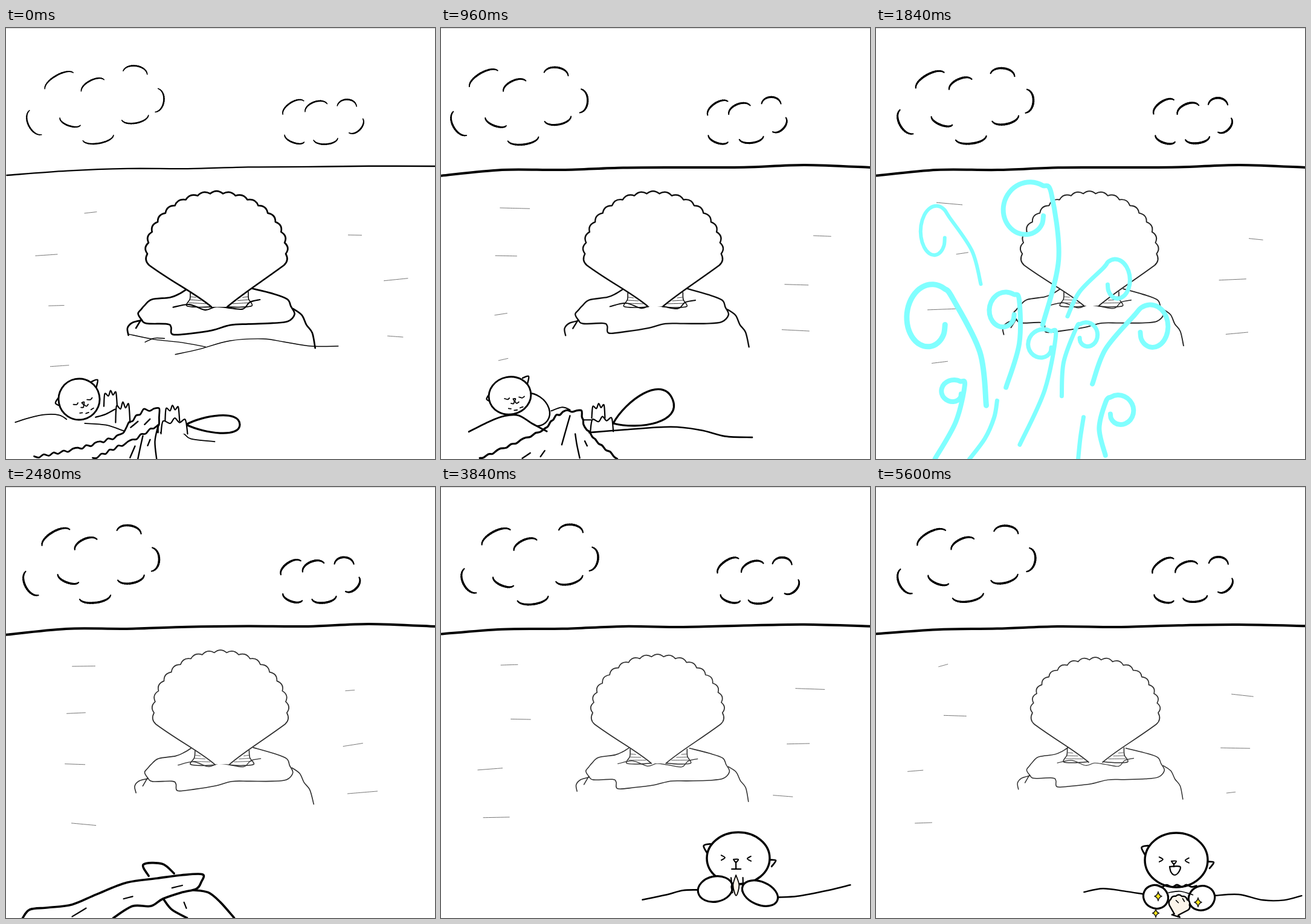
An HTML page with a canvas for the animation above (5.68 s loop, 710 by 714 pixels).

```html
<!DOCTYPE html>
<html lang="ja">
<head>
<meta charset="utf-8">
<title>Shell bay</title>
<style>
html, body { margin: 0; width: 100%; height: 100%; overflow: hidden; background: #fff; }
canvas { display: block; width: 710px; height: 714px; }
</style>
</head>
<body>
<canvas id="stage" width="710" height="714"></canvas>
<script>
const c = document.getElementById('stage').getContext('2d');
const STEP = 80, FRAMES = 71, PI = Math.PI;
const HELD = [3, 7, 9, 11, 20, 27, 30, 34, 37, 40, 47, 51, 54];
const CREAM = '#fcf5ea', CYAN = '#80ffff', WHITE = '#fff';

const nums = s => s.split(' ').map(Number);
const mix = (a, b, u) => a + (b - a) * u;
const mixAll = (a, b, u) => a.map((v, i) => mix(v, b[i], u));
const clamp = v => Math.max(0, Math.min(1, v));
const ease = v => { v = clamp(v); return v * v * (3 - 2 * v); };

// Seeded random numbers from 0 to 1
function dice(seed) {
  let s = (seed + 1) * 7919;
  const roll = () => (s = (s * 16807 + 11) % 2147483647) / 2147483647;
  roll(); roll();
  return roll;
}

// Wobble of a line drawn anew
let amp = 0, seed = 0;
const bend = (x, y) => [
  x + amp * Math.sin(y * .03 + seed * 1.7),
  y + amp * .7 * Math.sin(x * .025 + seed * 2.3)
];

function place(x, y, rot, sx, sy, paint) {
  c.save();
  c.translate(x, y);
  c.rotate(rot);
  c.scale(sx, sy);
  paint();
  c.restore();
}

function finish(width, color = '#000', fill) {
  if (fill) { c.fillStyle = fill; c.fill(); }
  c.lineWidth = width;
  c.strokeStyle = color;
  c.stroke();
}

// Smooth strokes through points; "/" starts a new stroke
function ink(text, width, color, fill) {
  for (const part of text.split('/')) {
    const n = nums(part), p = [];
    for (let i = 0; i < n.length; i += 2) p.push(bend(n[i], n[i + 1]));
    const at = i => p[Math.max(0, Math.min(p.length - 1, i))];
    c.beginPath();
    c.moveTo(...p[0]);
    for (let i = 0; i < p.length - 1; i++) {
      const [a, b, d, e] = [at(i - 1), at(i), at(i + 1), at(i + 2)];
      c.bezierCurveTo(b[0] + (d[0] - a[0]) / 6, b[1] + (d[1] - a[1]) / 6,
        d[0] - (e[0] - b[0]) / 6, d[1] - (e[1] - b[1]) / 6, d[0], d[1]);
    }
    finish(width, color, fill);
  }
}

// Ragged edge along a polyline
function ragged(text, width, size = 1.8) {
  const n = nums(text), roll = dice(n[0]), out = [];
  for (let i = 0; i < n.length - 2; i += 2) {
    const steps = Math.ceil(Math.hypot(n[i + 2] - n[i], n[i + 3] - n[i + 1]) / 9);
    for (let k = 0; k < steps; k++) {
      out.push(mix(n[i], n[i + 2], k / steps) + (roll() - .5) * size,
        mix(n[i + 1], n[i + 3], k / steps) + (k % 2 - .5) * size * 2);
    }
  }
  ink([...out, ...n.slice(-2)].join(' '), width);
}

function blob(x, y, rx, ry, rot, width) {
  c.beginPath();
  c.ellipse(x, y, rx, ry, rot, 0, 2 * PI);
  finish(width, '#000', WHITE);
}

// ---- Sky and sea ----

// Cloud edges, clockwise: start, end, bulge
const puffs = [
  '66 98 112 72 10', '123 104 160 86 9', '192 72 232 77 11', '252 101 249 140 12',
  '236 146 192 155 9', '181 178 130 186 9', '124 161 90 148 7', '60 178 40 138 12',
  '460 143 494 120 9', '498 140 534 126 10', '550 126 582 127 11', '591 152 568 175 9',
  '551 182 511 186 8', '494 189 462 178 7'
].map(nums);

// Brush arc, thinner at its ends
function puff(x0, y0, x1, y1, bulge, width) {
  const len = Math.hypot(x1 - x0, y1 - y0);
  const nx = (y1 - y0) / len, ny = (x0 - x1) / len;
  const at = t => {
    const along = mix(t, t * t * (3 - 2 * t), .7), up = bulge * 4 * t * (1 - t);
    return bend(mix(x0, x1, along) + nx * up, mix(y0, y1, along) + ny * up);
  };
  const N = 14;
  for (let i = 0; i < N; i++) {
    c.beginPath();
    c.moveTo(...at(i / N));
    c.lineTo(...at((i + 1) / N));
    finish(width * (.6 + .4 * Math.sin(PI * (i + .5) / N)));
  }
}

function sky(d) {
  const roll = dice(d), shake = () => (roll() - .5) * 5;
  const drift = -28 * Math.exp(-d / 30) * Math.sin(PI * d / 23.5) ** 2;
  for (const [x0, y0, x1, y1, bulge] of puffs) {
    const dx = drift + shake(), dy = shake();
    puff(x0 + dx, y0 + dy, x1 + dx, y1 + dy, bulge, mix(2.6, 3.5, ease(d / 20)));
  }
  ink('0 244 100 236 200 234 300 232 400 231 500 230 600 228 710 230', mix(2.3, 4, ease(d / 10)));
}

function ripples(d) {
  const roll = dice(d + 100);
  for (let i = 0; i < 7; i++) {
    const x = (i % 2 ? 545 : 45) + roll() * 90, y = 290 + i * 42 + roll() * 20;
    const len = 14 + roll() * 36;
    ink(`${x} ${y} ${x + len} ${y + (roll() - .6) * 8}`, .9, '#666');
  }
}

// ---- Rock and shell ----

function rock(u, width, color, wet) {
  const s = mix(1, .88, u);
  place(475 * (1 - s), 430 * (1 - s), 0, s, s, () => {
    ink('298 432 285 440 270 446 240 450 228 460 222 467 217 474 223 484 231 490 265 490 272 495 275 507 305 505 340 500 370 492 400 491 440 490 465 487 476 475 470 462 464 450 440 441 405 432', width, color);
    ink('223 485 208 489 200 498 202 510/222 484 214 498/474 466 488 476 496 492 506 505 512 530', width, color);
    ink('275 462 302 457 328 466 345 461 365 463 390 466 402 455 419 451', width * .8, color);
    if (wet) ink('201 508 245 516 290 520 330 527/230 521 245 514 262 514/281 540 320 531 370 518 425 516 460 521 505 527 550 526', 1.4);
  });
}

function hinge(x, y, side, color) {
  place(x, y, 0, side, 1, () => {
    ink('-34 -24 -35 -12 -41 -1 -20 1 0 0', 1.6, color);
    for (let k = 0; k < 3; k++) ink(`${-33 - k * 2} ${-16 + k * 5} ${-25 + k * 8} ${-15 + k * 5}`, .8, color);
  });
}

function bigShell(u, drop, width, color) {
  const L = mix(231, 256, u), R = mix(466, 470, u), T = 271 + 12 * drop, S = 379;
  const ax = mix(340, 352, u), bx = mix(366, 375, u), by = mix(462, 456, u);
  hinge(ax, by, 1, color);
  hinge(bx, by, -1, color);
  const cx = (L + R) / 2, rx = (R - L) / 2 - 3, ry = S - T - 3, N = 17;
  c.beginPath();
  c.moveTo(ax, by);
  c.bezierCurveTo(ax - 26, by - 22, L + 44, S + 42, L + 6, S + 14);
  c.quadraticCurveTo(L - 3, S + 6, cx - rx, S - 5);
  for (let k = 1; k <= N; k++) {
    const m = PI * (1 + (k - .5) / N), a = PI * (1 + k / N), y = S - 5;
    c.quadraticCurveTo(cx + (rx + 8) * Math.cos(m), y + (ry + 3) * Math.sin(m),
      cx + rx * Math.cos(a), y + (ry - 5) * Math.sin(a));
  }
  c.quadraticCurveTo(R + 3, S + 6, R - 6, S + 14);
  c.bezierCurveTo(R - 44, S + 42, bx + 26, by - 22, bx, by);
  finish(width, color, WHITE);
}

function scenery(d) {
  const u = d / (FRAMES - 1), age = ease(d / 34);
  const width = mix(2.7, 1.7, age), color = `rgb(${Array(3).fill(Math.round(48 * age))})`;
  sky(d);
  ripples(d);
  rock(u, width, color, d < 8);
  bigShell(u, ease((d - 36) / 22), width, color);
}

// ---- Sleeping otter, kelp and waves ----

function paw(x, y, w, h) {
  ink([-.5, .5, -.42, -.3, -.15, -.16, .02, -.5, .2, -.22, .42, -.4, .5, .5]
    .map((v, i) => i % 2 ? y + v * h : x + v * w).join(' '), 2.2, '#000', WHITE);
}

function tail(x, y, len, r, rot) {
  place(x, y, rot, 1, 1, () => {
    c.beginPath();
    c.moveTo(0, 0);
    c.bezierCurveTo(len * .3, -r, len, -r * 1.7, len, 0);
    c.bezierCurveTo(len, r * 1.5, len * .35, r, 0, 0);
    finish(3.2, '#000', WHITE);
  });
}

function sleepyHead(x, y, rx, ry, tilt) {
  ink(`${x + 21} ${y - 29} ${x + 31} ${y - 32} ${x + 29} ${y - 20}/${x - 33} ${y - 4} ${x - 39} ${y + 6} ${x - 31} ${y + 11}`, 2.4);
  blob(x, y, rx, ry, -.2, 2.9);
  place(x + 7, y + 7, tilt, 1, 1, () => {
    ink('-16 -4 -11 -2 -8 -4/8 -4 13 -2 17 -4/-2 -2 2 -2 0 2 -2 -2/-6 5 -2 6 0 2 3 6 7 4', 1.8);
    ink('-11 13 -7 14/-2 17 3 17/8 14 13 13', 1.8);
  });
}

function floating() {
  ink('15 653 40 645 65 640 88 641 100 648/130 655 165 658 195 668/255 670 290 670 305 680 345 685', 1.8);
  ink('148 645 165 640 180 632', 2.2);
  paw(173, 614, 22, 26);
  paw(193, 637, 24, 34);
  tail(298, 657, 89, 15, 0);
  paw(275, 638, 24, 26);
  paw(278, 659, 44, 26);
  sleepyHead(121, 615, 34, 34, -.35);
  ragged('47 711 118 697 155 687 190 675 204 655 228 633 254 632 251 670', 2.8);
  ragged('144 714 185 694 208 684 252 657', 2.8);
  ink('226 676 222 694 218 714/251 660 246 685 249 714/205 712 213 693/206 662 218 652/229 657 238 648/234 692 238 682', 2.4);
}

function tuckedIn() {
  blob(150, 632, 32, 25, .6, 2.4);
  sleepyHead(114, 609, 35, 31, -.1);
  paw(260, 634, 22, 24);
  paw(266, 656, 38, 25);
  tail(285, 655, 106, 27, -.38);
  ink('182 634 200 628 213 632/235 649 248 649', 2);
  ink('46 669 80 652 105 643 128 642 150 655 175 668', 2.8, '#000', WHITE);
  ink('245 670 300 666 380 661 430 666 470 676 515 678', 2.6);
  ragged('64 714 100 698 140 680 172 664 190 642 208 634 232 635 236 658 255 682 292 714', 3.2, 1.3);
  ink('213 642 208 660 200 690/222 672 225 690 230 712/165 710 172 700/135 713 148 704/238 684 242 692', 2.4);
}

function sleeper(d) {
  c.save();
  c.translate(0, 3 * Math.sin(d * PI / 6) * (d < 13) + Math.max(0, d - 13) * 28);
  if (d < 8) floating(); else tuckedIn();
  c.restore();
}

// Curls: root, centre, radii, direction, brush
const curls = [
  '173 424 100 340 27 45 -1 6', '276 492 254 303 45 48 -1 8', '182 625 92 482 43 57 -1 9',
  '215 595 214 469 28 32 -1 8', '238 690 277 525 26 26 -1 7', '307 610 348 510 20 22 1 7',
  '317 478 396 419 25 36 1 7', '358 590 454 497 31 39 1 8', '98 714 129 603 22 20 -1 8',
  '380 708 401 635 26 27 1 8'
].map(nums);

function curl(x, y, cx, cy, rx, ry, side, width) {
  const spiral = [], N = 12;
  for (let i = 0; i <= N; i++) {
    const a = PI * mix(.2, 1.9, i / N), k = mix(1, .55, (i / N) ** 3);
    spiral.push(cx - side * rx * k * Math.cos(a), cy - ry * k * Math.sin(a));
  }
  const mx = (x + spiral[0]) / 2 - side * rx * .42, my = (y + spiral[1]) / 2;
  ink([x, y, mx, my, ...spiral].join(' '), width, CYAN);
}

function splash(d) {
  const below = d < 19 ? (19 - d) * 95 : Math.max(0, d - 23) * 110;
  const size = 1 + .45 * clamp(1 - Math.abs(d - 19) / 4);
  place(250, 714 + below, 0, size, size, () => {
    c.translate(-250, -714);
    for (const k of curls) curl(...k);
    ink('155 714 180 680 195 645 200 617/335 714 338 680 343 645', 7, CYAN);
  });
}

function kelp(d) {
  c.save();
  c.translate(0, d < 31 ? (31 - d) * 35 : Math.max(0, d - 32) * 22);
  ink('28 714 40 700 70 697 110 692 150 675 200 655 250 648 290 643 325 642 323 655 315 666 290 672 260 682 240 694 210 694 178 714', 3.6);
  ink('236 644 227 625 258 624 278 640/262 684 275 700 300 714/310 668 335 672 355 688 378 714', 3.6);
  ink('275 664 292 660/195 682 210 678/110 712 133 698/295 688 299 698', 2.2);
  c.restore();
}

// ---- Waking otter ----

function star(x, y, r) {
  c.beginPath();
  c.moveTo(x, y - r);
  for (let k = 0; k < 4; k++) {
    const a = (k - .5) * PI / 2, e = k * PI / 2, reach = k % 2 ? r : r * .8;
    c.quadraticCurveTo(x + r * .25 * Math.cos(a), y + r * .25 * Math.sin(a),
      x + reach * Math.cos(e), y + reach * Math.sin(e));
  }
  finish(1.6, '#222', '#ffe91a');
}

function cockle(x, y, r, turn, word, tilt) {
  place(x, y, turn, r, r, () => {
    c.beginPath();
    c.moveTo(-.2, 1);
    c.lineTo(-.9, .35);
    for (let k = 0; k < 6; k++) {
      const a = PI * (.9 + k * .2), e = a + PI * .2;
      c.quadraticCurveTo(1.17 * Math.cos(a + .31), 1.1 * Math.sin(a + .31), Math.cos(e), .85 * Math.sin(e));
    }
    c.lineTo(.2, 1);
    c.lineTo(.4, 1.15);
    c.lineTo(-.4, 1.15);
    c.closePath();
    finish(2.4 / r, '#000', CREAM);
  });
  place(x, y, tilt, 1, 1, () => {
    c.fillStyle = '#000';
    c.font = `500 ${r * .88}px "Noto Sans CJK JP", "Noto Sans CJK", sans-serif`;
    c.textAlign = 'center';
    c.textBaseline = 'middle';
    c.fillText(word, 0, 0);
  });
}

function head(x, y, rx, ry, smile) {
  place(x, y, 0, 1, 1, () => {
    ink('-46 -24 -57 -21 -51 -8/50 3 62 4 55 14', 2.8);
    blob(0, 0, rx, ry, 0, 3.4);
    ink('-28 -5 -22 -1 -28 3/21 -3 15 1 21 5/-8 2 0 2 -4 7 -8 2', 2);
    ink(smile ? '-4 6 -4 11/-11 11 6 11 4 20 -3 25 -9 20 -11 11' : '-4 6 -4 17/-11 18 4 18', 2.2);
  });
}

const chin = y => ragged(`465 ${y} 530 ${y}`, 2.8);

function rising(d) {
  c.save();
  c.beginPath();
  c.rect(330, 540, 360, 131);
  c.clip();
  head(492, 615 + (47 - d) * 17, 52, 43, false);
  c.restore();
  ink('333 684 380 674 425 667 490 672 557 680 600 677 677 659', 2.4);
}

function clasping() {
  ink('333 684 370 676 400 668 425 667/557 680 590 678 640 668 677 659', 2.6);
  head(492, 615, 52, 43, false);
  blob(454, 666, 29, 21, -.2, 3.2);
  blob(528, 673, 31, 19, .4, 3.2);
  ragged('479 649 482 672', 2.2);
  ragged('499 649 498 670', 2.2);
  ink('488 643 483 660 488 677 493 660 488 643', 1.8, '#000', CREAM);
}

function cheering(pose, open, fold) {
  const [lx, ly] = mixAll(mixAll([480, 650], [399, 604], open), [488, 685], fold);
  const [rx, ry] = mixAll(mixAll([497, 650], [586, 627], open), [513, 685], fold);
  const size = mix(14 + 14 * open, 16, fold);
  ink('342 687 365 677 395 672 500 672 560 675 610 683 660 686 699 685', 2.4);
  ink(`${lx + 10} ${ly + 28} 413 ${mix(655, 675, fold)} 430 672/${lx + 14} ${ly + 24} 447 642`, 2.8);
  ink(`${rx - 13} ${ry + 19} 573 662 567 674/${rx - 25} ${ry + 13} 547 645 533 657`, 2.8);
  head(...pose, true);
  chin(658);
  cockle(lx, ly, size, -.5 * open, '名', .15);
  cockle(rx, ry, size * .92, .7 * open, '言', .08);
}

function nibbling(pose) {
  ink('344 671 375 665 410 669 441 674/562 677 600 675 640 684 675 684 704 677', 2.4);
  head(...pose, true);
  blob(463, 679, 21, 19, .5, 3.2);
  blob(539, 681, 22, 20, -.4, 3.2);
  chin(661);
  cockle(502, 692, 17, .3, '', 0);
  ink('484 672 503 670 524 676/496 685 500 689/507 682 510 687', 1.6);
}

function otter(d) {
  if (d < 47) return rising(d);
  if (d < 55) return clasping();
  const open = ease((d - 54) / 4), fold = ease((d - 62) / 7);
  const pose = mixAll(mixAll([492, 615, 52, 43], [493, 618, 54, 47], open), [497, 618, 52, 45], fold);
  if (d < 69) cheering(pose, open, fold); else nibbling(pose);
  if (d < 57) return;
  const r = mix(12, 7.5, fold);
  star(mix(383, 467, fold), mix(564, 678, fold), r);
  star(mix(558, 533, fold), mix(587, 688, fold), r);
  star(mix(386, 463, fold), mix(654, 706, fold), r * .9);
}

function draw(n) {
  const d = HELD.includes(n) ? n - 1 : n;
  c.fillStyle = WHITE;
  c.fillRect(0, 0, 710, 714);
  c.fillStyle = '#d0d0d0';
  c.fillRect(0, 0, 710, 1);
  c.lineCap = c.lineJoin = 'round';
  seed = d;
  amp = 1.6;
  scenery(d);
  amp = .5;
  if (d < 19) sleeper(d);
  if (d >= 13 && d < 28) splash(d);
  if (d >= 28 && d < 37) kelp(d);
  if (d >= 41) otter(d);
}

const start = performance.now();
function tick() {
  draw(Math.floor((performance.now() - start) / STEP) % FRAMES);
  requestAnimationFrame(tick);
}
tick();
</script>
</body>
</html>
```
